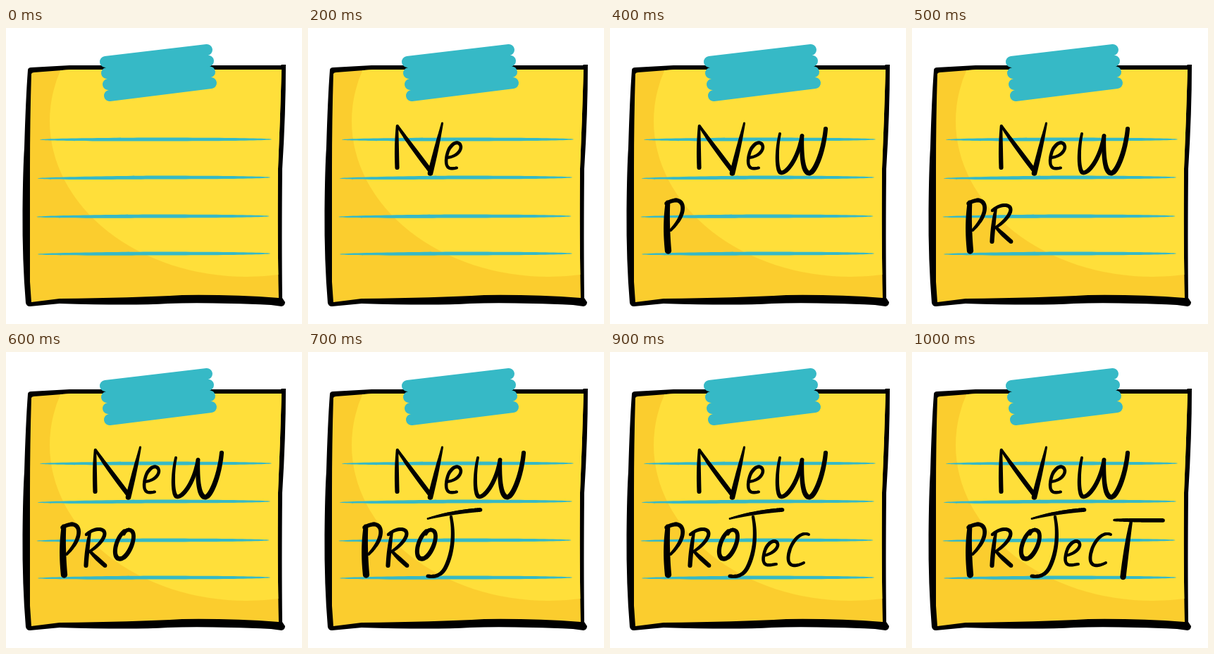
Write an HTML page with a canvas that moves like this. It is 420 px wide and 420 px high and loops after 1.1 s.

```html
<!DOCTYPE html>
<html lang="en">
<head>
<meta charset="utf-8">
<title>New project note</title>
<style>
html, body { margin: 0; width: 100%; height: 100%; overflow: hidden; background: #fff; }
canvas { display: block; width: 420px; height: 420px; }
</style>
</head>
<body>
<canvas id="stage" role="img" aria-label="Sticky note: New project"></canvas>
<script>
const STEP = 100, TEAL = '#36b9c6';
const canvas = document.getElementById('stage');
const ctx = canvas.getContext('2d');
const scale = window.devicePixelRatio || 1;
canvas.width = canvas.height = 420 * scale;
ctx.scale(scale, scale);

const border = new Path2D(`M31 60Q31 56 36 56L90 53H390L391 52H397Q397 120 392 200Q391 300 392 383
  L396 389Q396 394 391 395L376 393Q285 389 230 391Q180 394 76 391L34 395Q29 395 28 390
  Q23 330 23.5 260Q24 200 26 170Q28 100 31 60Z`);
const paper = new Path2D(`M36 65Q37 63 40 63L92 59H391Q389 130 386 200Q385 300 387 383
  Q320 378 250 379Q180 383 76 384L36 389L34 360V200Q34 130 36 65Z`);

// A brush stroke swells from one radius to another, with a little extra in the middle.
function brush(d, from, to) {
  const curve = document.createElementNS('http://www.w3.org/2000/svg', 'path');
  curve.setAttribute('d', d);
  const length = curve.getTotalLength(), steps = Math.ceil(length * 2);
  const shape = new Path2D();
  for (let i = 0; i <= steps; i++) {
    const t = i / steps, { x, y } = curve.getPointAtLength(t * length);
    const r = from + (to - from) * t + 0.5 * Math.sin(Math.PI * t);
    shape.moveTo(x + r, y);
    shape.arc(x, y, r, 0, Math.PI * 2);
  }
  return shape;
}

const letters = {
  N: [
    brush('M126.5 139Q125.5 168 126.5 198', 1.8, 3.1),
    brush('M127 139Q138 156 173 202', 1.9, 3.1),
    brush('M190.5 135Q184 164 173.5 206', 1.6, 3.8)
  ],
  e: [brush('M198 184C213 182 220 171 215.5 165S199 166 196.5 184S204 200 211 198.5', 2, 2)],
  W: [
    brush('M241 150C236 172 236 202 242 205S266 190 272.5 153', 2, 2.8),
    brush('M272.5 153C271 192 276 206 283 206S303 176 306 143', 2.8, 3.1)
  ],
  P: [
    brush('M82 248Q79 280 82.5 316', 3.4, 4.7),
    brush('M80 249C95 240 106 245 102.5 261Q99 274 86 287', 2.7, 2)
  ],
  R: [
    brush('M119 256Q115 278 113.5 303', 2, 3.1),
    brush('M114 259C128 247 145 250 138.5 263Q134 273 119 283', 2.2, 2),
    brush('M119 283Q130 294 140.5 303', 2, 2.9)
  ],
  O: [brush('M168 254C154 266 150 294 162 293.5S188 258 177 253Q170 251 167 258', 2.7, 2.6)],
  J: [
    brush('M170 236.5Q205 227 244.5 224', 1.4, 2.8),
    brush('M203 234C208 260 205 286 195 306Q187 321 170 318', 2.2, 2.5)
  ],
  E: [brush('M218 289C233 286 241 276 237 270.5S221 271 218 289S228 302 236 301', 2, 2)],
  C: [brush('M282 259C268 253 254 275 253 291S266 304 275 299', 2, 2)],
  T: [
    brush('M287 238.5L356 239', 1.8, 2.8),
    brush('M311 240Q305 272 299.5 319', 2.2, 4.2)
  ]
};
const order = [...'NeWPROJECT'].map(ch => letters[ch]);

function rule(x1, y1, x2, y2) {
  const mid = (x1 + x2) / 2;
  ctx.beginPath();
  ctx.moveTo(x1, y1);
  for (const side of [-2.5, 2.5]) {
    const [a, b] = side < 0 ? [x1, x2] : [x2, x1];
    const [ya, yb] = side < 0 ? [y1, y2] : [y2, y1];
    ctx.bezierCurveTo(a, ya + side, mid, y2 + side, mid, y2 + side);
    ctx.bezierCurveTo(mid, y2 + side, b, yb + side, b, yb);
  }
  ctx.fill();
}

function drawNote() {
  ctx.fillStyle = '#fff';
  ctx.fillRect(0, 0, 420, 420);
  ctx.fillStyle = '#000';
  ctx.fill(border);
  ctx.fillStyle = '#fbcd2e';
  ctx.fill(paper);

  ctx.save();
  ctx.clip(paper);
  ctx.fillStyle = '#ffdf3a';
  ctx.beginPath();
  ctx.ellipse(342, 132, 280, 221, 0, 0, Math.PI * 2);
  ctx.fill();
  ctx.restore();

  ctx.fillStyle = ctx.strokeStyle = TEAL;
  rule(48, 158.5, 377, 158);
  rule(45, 213.5, 375, 212);
  rule(43.5, 268, 373.5, 267);
  rule(45, 321, 375, 320);

  ctx.lineWidth = 16;
  ctx.lineCap = 'round';
  ctx.beginPath();
  for (let i = 0; i < 4; i++) {
    ctx.moveTo(141 + 2 * i, 48 + 16 * i);
    ctx.lineTo(285 + 2 * i, 31 + 15.7 * i);
  }
  ctx.stroke();
}

const start = performance.now();
function frame(now) {
  const shown = Math.floor(Math.max(0, now - start) / STEP) % (order.length + 1);
  drawNote();
  ctx.fillStyle = '#000';
  order.slice(0, shown).flat().forEach(shape => ctx.fill(shape));
  requestAnimationFrame(frame);
}
frame(start);
</script>
</body>
</html>
```
